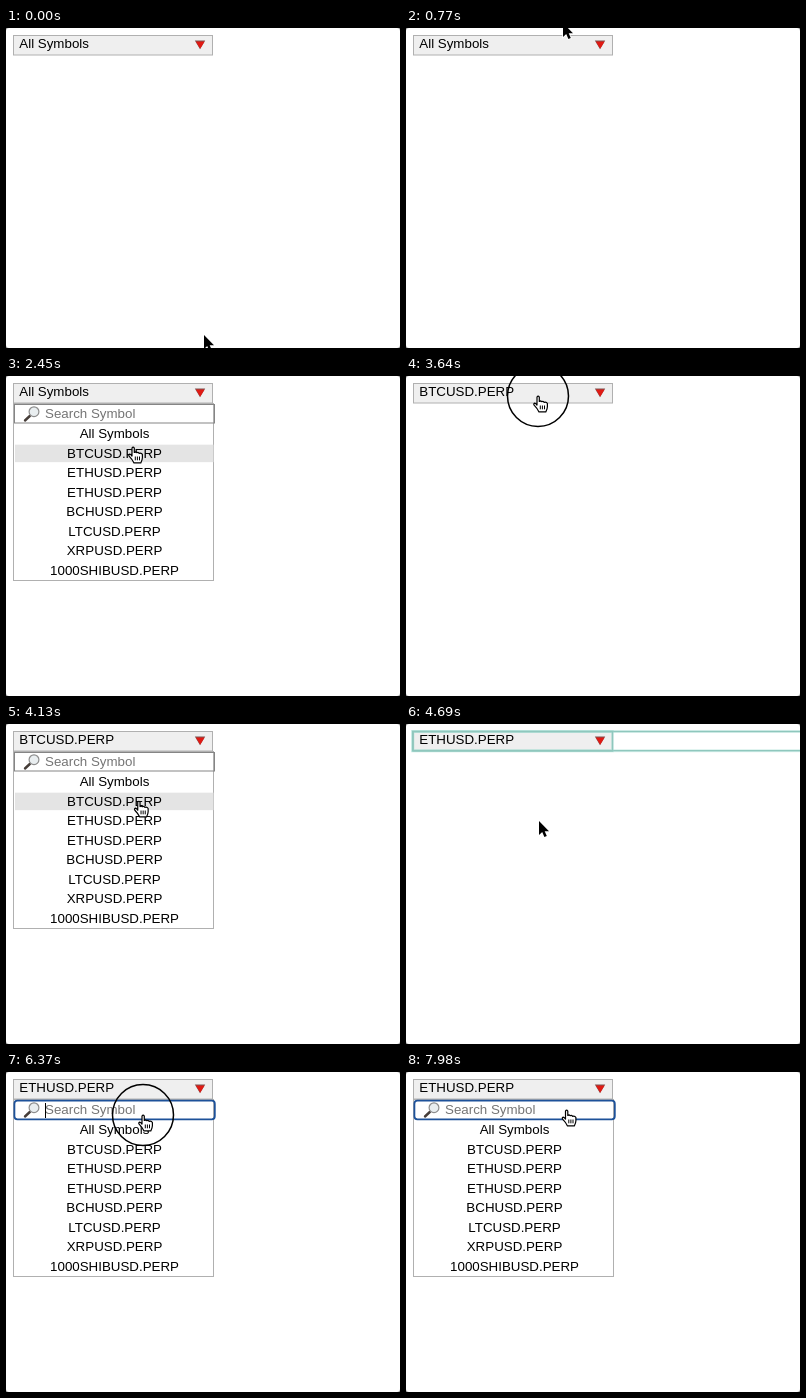
Recreate the animation shown at these times as an HTML page with a canvas. Size 394 px wide and 320 px high, loop 8 s.

```html
<!DOCTYPE html>
<html lang="en">
<head>
<meta charset="utf-8">
<title>Symbol picker</title>
<style>
html, body { margin: 0; width: 394px; height: 320px; overflow: hidden; background: #fff; }
canvas { display: block; }
</style>
</head>
<body>
<canvas id="stage" width="394" height="320"></canvas>
<script>
const ctx = document.getElementById('stage').getContext('2d');
const W = 394, H = 320, LOOP = 8000, STEP = 70;
const FONT = '13.333px "Liberation Sans", Arial, sans-serif';
const ROW_TOP = 48, ROW_H = 19.45, FLASH_MS = 280, BLINK_MS = 560;
const ROWS = ['All Symbols', 'BTCUSD.PERP', 'ETHUSD.PERP', 'ETHUSD.PERP',
  'BCHUSD.PERP', 'LTCUSD.PERP', 'XRPUSD.PERP', '1000SHIBUSD.PERP'];

// The pointer sweeps in along an arc, then rests between these moves.
const ENTRY = { start: 0, end: 560, x: 148, y: 17, bend: 46 };
const MOVES = [
  { start: 560, end: 630, x: 148, y: -30 },
  { start: 630, end: 770, x: 157, y: -5 },
  { start: 770, end: 910, x: 179, y: 15 },
  { start: 1960, end: 2450, x: 127, y: 71 },
  { start: 3080, end: 3570, x: 132, y: 20 },
  { start: 3710, end: 4340, x: 133, y: 97 },
  { start: 4760, end: 5040, x: 135, y: 25 },
  { start: 5740, end: 5950, x: 137, y: 43 },
  { start: 6720, end: 6930, x: 155, y: 21 },
  { start: 7000, end: 7140, x: 160.5, y: 38 }
];
// Each click opens the list, or picks an entry and closes it.
const CLICKS = [
  { down: 1260, up: 1400 },
  { down: 2940, up: 3010, pick: 1 },
  { down: 3640, up: 3710 },
  { down: 4620, up: 4690, pick: 2 },
  { down: 5250, up: 5320 }
];
const SEARCH = { down: 6370, up: 6440 };

const mix = (a, b, k) => a + (b - a) * k;
const ease = k => k * k * (3 - 2 * k);

function pointerAt(t) {
  const k = Math.min(1, t / ENTRY.end);
  let x = mix(198, ENTRY.x, k) + ENTRY.bend * Math.sin(Math.PI * k);
  let y = mix(307, ENTRY.y, k);
  for (const m of MOVES) {
    if (t <= m.start) break;
    const e = ease(Math.min(1, (t - m.start) / (m.end - m.start)));
    x = mix(x, m.x, e);
    y = mix(y, m.y, e);
  }
  return [x, y];
}

function stateAt(t) {
  const state = { open: false, label: ROWS[0], flash: false };
  for (const c of CLICKS) {
    if (t < c.up) break;
    state.open = !c.pick;
    if (c.pick) state.label = ROWS[c.pick];
    state.flash = t < c.up + FLASH_MS;
  }
  state.pressed = [...CLICKS, SEARCH].some(c => t >= c.down && t < c.up);
  state.focused = t >= SEARCH.down;
  state.caret = state.focused && Math.floor((t - SEARCH.down) / BLINK_MS) % 2 === 0 && t < 7980;
  return state;
}

function fillBox(x, y, w, h, color) {
  ctx.fillStyle = color;
  ctx.fillRect(x, y, w, h);
}

function strokeBox(x, y, w, h, color, line = 1) {
  ctx.strokeStyle = color;
  ctx.lineWidth = line;
  ctx.strokeRect(x, y, w, h);
}

function text(s, x, y, color = '#000', align = 'left') {
  ctx.font = FONT;
  ctx.textAlign = align;
  ctx.fillStyle = color;
  ctx.fillText(s, x, y);
}

function triangle(x, y, w, h, color) {
  ctx.fillStyle = color;
  ctx.beginPath();
  ctx.moveTo(x, y);
  ctx.lineTo(x + w, y);
  ctx.lineTo(x + w / 2, y + h);
  ctx.fill();
}

function drawSelect(label) {
  fillBox(7, 7, 200, 20, '#efefef');
  strokeBox(7.5, 7.5, 199, 19.5, '#b0b0b0');
  text(label, 13.3, 20);
  triangle(188.8, 12.6, 10.4, 8.6, '#7d5553');
  triangle(189.8, 13.6, 8.8, 7.2, '#e01a14');
}

function drawLens() {
  ctx.lineCap = 'round';
  ctx.strokeStyle = '#463d38';
  ctx.lineWidth = 2.4;
  ctx.beginPath();
  ctx.moveTo(19, 44.5);
  ctx.lineTo(23.8, 40);
  ctx.stroke();
  ctx.beginPath();
  ctx.arc(28, 35.7, 4.9, 0, Math.PI * 2);
  ctx.fillStyle = '#e9eef0';
  ctx.fill();
  ctx.strokeStyle = '#8d8d8d';
  ctx.lineWidth = 1.2;
  ctx.stroke();
  ctx.lineCap = 'butt';
}

function drawPopup(hover, focused, caret) {
  fillBox(7, 27, 201, 178, '#fff');
  strokeBox(7.5, 27.5, 200, 177, '#b0b0b0');
  if (focused) {
    ctx.beginPath();
    ctx.roundRect(8.4, 28.7, 200.4, 18.6, 3);
    ctx.strokeStyle = '#1d5199';
    ctx.lineWidth = 1.8;
    ctx.stroke();
  } else {
    strokeBox(8.5, 28.5, 200, 18.5, '#858585');
  }
  drawLens();
  text('Search Symbol', 39, 42, '#757575');
  if (caret) fillBox(39, 31, 1, 15, '#000');
  ROWS.forEach((row, i) => {
    const y = ROW_TOP + i * ROW_H;
    if (i === hover) fillBox(9, y + 1.2, 198.5, 17.5, '#e4e4e4');
    text(row, 108.5, y + 14.4, '#000', 'center');
  });
}

function drawFlash(open) {
  const ring = (x, y, w, h) => {
    strokeBox(x, y, w, h, 'rgba(150,215,203,.35)', 3);
    strokeBox(x, y, w, h, '#8fc7bd', 1.4);
  };
  ring(6.7, 7.5, W, 19.2);
  ring(6.7, 7.5, 199.8, 19.2);
  if (open) ring(6.7, 27, 201.6, 178.5);
}

function drawArrow(x, y) {
  ctx.save();
  ctx.translate(x, y);
  const p = new Path2D('M0 0V14L3.2 11.1L5.4 16L7.8 15L5.7 10.2H10Z');
  ctx.strokeStyle = '#fff';
  ctx.lineWidth = 1.6;
  ctx.stroke(p);
  ctx.fillStyle = '#000';
  ctx.fill(p);
  ctx.restore();
}

function drawHand(x, y) {
  ctx.save();
  ctx.translate(x - 5, y - 0.5);
  ctx.lineJoin = 'round';
  const p = new Path2D('M4 9.6V1.6Q5.1 -.2 6.3 1.6V6Q7.5 4.9 8.7 6.2Q10 5.3 11.2 6.8' +
    'Q13.4 6.2 14.4 8V11.2Q14.4 13 12.8 16.4H6Q4.8 13.6 1.1 9.7Q.2 8 1.7 7.6Q3 7.8 4 9.6Z');
  ctx.fillStyle = '#fff';
  ctx.fill(p);
  ctx.strokeStyle = '#000';
  ctx.lineWidth = 1.2;
  ctx.stroke(p);
  ctx.lineWidth = 1;
  ctx.stroke(new Path2D('M7.3 10V13.8M9.4 10V13.8M11.5 10V13.8'));
  ctx.restore();
}

function drawPress(x, y) {
  ctx.beginPath();
  ctx.arc(x, y, 30.5, 0, Math.PI * 2);
  ctx.strokeStyle = '#000';
  ctx.lineWidth = 1.5;
  ctx.stroke();
}

function drawCorners() {
  ctx.fillStyle = '#858585';
  ctx.beginPath();
  ctx.rect(0, 0, W, H);
  ctx.roundRect(0, 0, W, H, 3);
  ctx.fill('evenodd');
}

function draw(t) {
  const [x, y] = pointerAt(t);
  const s = stateAt(t);
  const hover = Math.floor((y - ROW_TOP) / ROW_H);
  const onTarget = x > 7 && x < 208 && y >= 7 && y < (s.open ? 205 : 28);

  fillBox(0, 0, W, H, '#fff');
  drawSelect(s.label);
  if (s.open) drawPopup(hover, s.focused, s.caret);
  if (s.flash) drawFlash(s.open);
  drawCorners();
  (onTarget ? drawHand : drawArrow)(x, y);
  if (s.pressed) drawPress(x, y);
}

const start = performance.now();
function tick() {
  const t = (performance.now() - start) % LOOP;
  draw(Math.floor(t / STEP) * STEP);
  requestAnimationFrame(tick);
}
tick();
</script>
</body>
</html>
```
